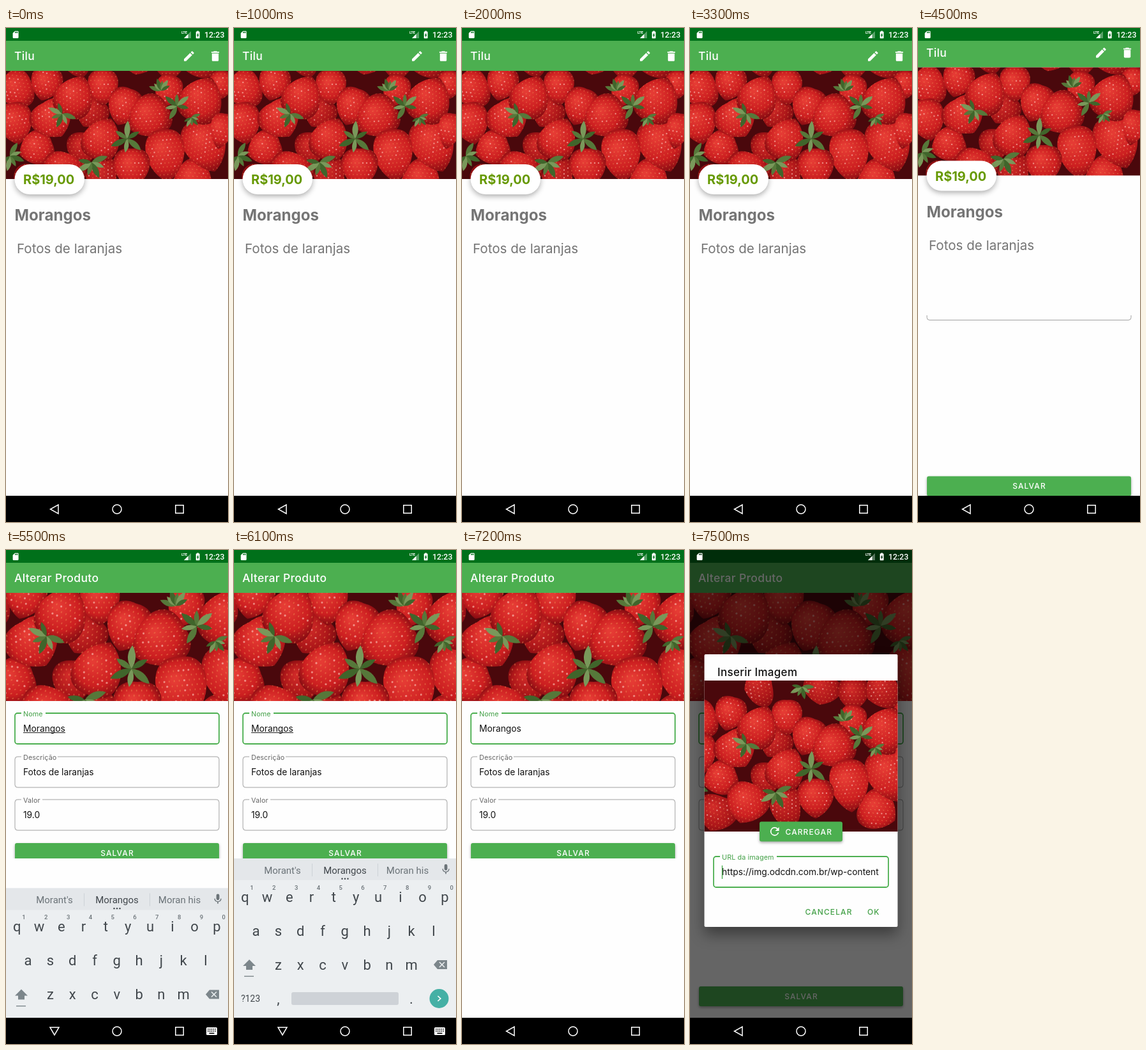
Write an HTML page with a canvas that moves like this. It is 348 by 772 pixels and loops after 8000 ms.

```html
<!DOCTYPE html>
<html lang="pt-BR">
<head>
<meta charset="utf-8">
<title>Alterar Produto</title>
<style>
html, body { margin: 0; width: 100%; height: 100%; overflow: hidden; background: #fff; }
canvas { display: block; width: 348px; height: 772px; }
</style>
</head>
<body>
<canvas id="stage"></canvas>
<script>
const W = 348, H = 772, LOOP = 8000, STEP = 100;
const GREEN = '#4caf50', DARK = '#00701a', PAPER = '#fefefe', GREY = '#757575';
const SANS = 'Inter, "Open Sans", sans-serif', KEYS = 'Roboto, sans-serif';

const stage = document.getElementById('stage');
const dpr = window.devicePixelRatio || 1;
stage.width = W * dpr;
stage.height = H * dpr;
let c = stage.getContext('2d');

// ---------- helpers ----------
function rect(x, y, w, h, fill, r = 0) {
  c.beginPath();
  c.roundRect(x, y, w, h, r);
  c.fillStyle = fill;
  c.fill();
}

function shadowed(blur, dy, alpha, draw) {
  c.save();
  c.shadowColor = `rgba(0,0,0,${alpha})`;
  c.shadowBlur = blur * dpr;
  c.shadowOffsetY = dy * dpr;
  draw();
  c.restore();
}

function text(s, x, y, size, fill, { weight = 400, align = 'left', gap = 0, font = SANS } = {}) {
  c.font = `${weight} ${size}px ${font}`;
  c.letterSpacing = gap + 'px';
  c.textAlign = align;
  c.fillStyle = fill;
  c.fillText(s, x, y);
}

function icon(d, x, y, scale, fill) {
  c.save();
  c.translate(x, y);
  c.scale(scale, scale);
  c.fillStyle = fill;
  c.fill(new Path2D(d));
  c.restore();
}

function poly(points, close = true) {
  c.beginPath();
  points.forEach(([x, y]) => c.lineTo(x, y));
  if (close) c.closePath();
}

function clipTo(x, y, w, h, draw) {
  c.save();
  c.beginPath();
  c.rect(x, y, w, h);
  c.clip();
  draw();
  c.restore();
}

const ease = (t, from, to) => {
  const p = Math.min(1, Math.max(0, (t - from) / (to - from)));
  return 1 - (1 - p) ** 3;
};

const ICON = {
  edit: 'M3 17.25V21h3.75L17.81 9.94l-3.75-3.75zM20.71 7.04a1 1 0 0 0 0-1.41l-2.34-2.34a1 1 0 0 0-1.41 0l-1.83 1.83 3.75 3.75z',
  trash: 'M6 19c0 1.1.9 2 2 2h8c1.1 0 2-.9 2-2V7H6zM19 4h-3.5l-1-1h-5l-1 1H5v2h14z',
  reload: 'M17.65 6.35A8 8 0 1 0 19.73 14h-2.08A6 6 0 1 1 12 6c1.66 0 3.14.69 4.22 1.78L13 11h7V4z',
  card: 'M18 2h-8L4 8v12c0 1.1.9 2 2 2h12c1.1 0 2-.9 2-2V4c0-1.1-.9-2-2-2zM12 8h-2V4h2zm3 0h-2V4h2zm3 0h-2V4h2z',
  battery: 'M15.67 4H14V2h-4v2H8.33C7.6 4 7 4.6 7 5.33v15.33C7 21.4 7.6 22 8.33 22h7.33c.74 0 1.34-.6 1.34-1.33V5.33C17 4.6 16.4 4 15.67 4zM11 20v-5.5H9L13 7v5.5h2z',
  mic: 'M12 14a3 3 0 0 0 3-3V5a3 3 0 0 0-6 0v6a3 3 0 0 0 3 3zm5.3-3a5.3 5.3 0 0 1-10.6 0H5a7 7 0 0 0 6 6.7V21h2v-3.3a7 7 0 0 0 6-6.7z'
};

// ---------- strawberry photo ----------
const PHOTO = { top: 35, h: 240, res: 2 };
// x, y, half width, half height, turn in degrees
const BERRIES = [
  [108, 45, 34, 22, 80], [207, 50, 32, 22, 10], [256, 55, 26, 26, 0], [302, 50, 34, 26, 60],
  [134, 132, 28, 24, 30], [120, 188, 26, 26, 0], [150, 232, 34, 24, 90], [42, 242, 34, 28, 20],
  [16, 96, 32, 27, 70], [63, 86, 26, 27, 15], [152, 92, 25, 28, 0], [338, 88, 20, 22, 0],
  [254, 98, 22, 26, 20], [186, 122, 28, 30, 20], [14, 148, 29, 33, -10], [48, 188, 29, 27, 70],
  [90, 226, 36, 32, 20], [294, 238, 34, 30, -60], [72, 142, 35, 30, -30], [107, 108, 32, 34, 205],
  [150, 174, 31, 34, 205], [224, 139, 35, 35, 60], [312, 182, 36, 43, -20], [250, 198, 32, 41, -5],
  [306, 113, 36, 37, 205], [338, 160, 19, 28, 10], [197, 218, 30, 31, 0]
];
// x, y, blade length, first angle, sweep
const LEAVES = [
  [88, 134, 23, 20, 230], [190, 173, 28, 40, 290], [243, 98, 20, 200, 130], [268, 122, 24, 120, 250],
  [134, 210, 27, -20, 210], [6, 200, 24, -60, 200], [290, 140, 16, -20, 170], [175, 45, 20, 0, 190]
];

function seeded(seed) {
  return () => (seed = (seed * 16807) % 2147483647) / 2147483647;
}

function berry([x, y, rx, ry, deg], i, rnd) {
  const r = Math.max(rx, ry), a = deg * Math.PI / 180;
  c.save();
  c.translate(x, y);
  c.rotate(a);
  c.beginPath();
  c.moveTo(0, -ry * .95);
  c.bezierCurveTo(rx * 1.35, -ry * 1.1, rx * 1.2, ry * .55, 0, ry * 1.05);
  c.bezierCurveTo(-rx * 1.2, ry * .55, -rx * 1.35, -ry * 1.1, 0, -ry * .95);
  c.clip();
  c.rotate(-a);
  const g = c.createRadialGradient(-r * .2, -r * .3, r * .1, 0, 0, r * 1.1);
  g.addColorStop(0, i < 8 ? '#cf2a28' : '#e53b34');
  g.addColorStop(.6, i < 8 ? '#ad1719' : '#cc1f20');
  g.addColorStop(1, '#790a10');
  c.fillStyle = g;
  c.fillRect(-r * 1.4, -r * 1.4, r * 2.8, r * 2.8);
  c.rotate(a);
  for (let row = 0, v = -r; v < r; v += 6, row++) {
    for (let u = -r + (row % 2) * 3; u < r; u += 6) {
      const shine = rnd() < .22 && Math.hypot(u, v) < r * .65;
      c.beginPath();
      c.ellipse(u, v, shine ? 1.2 : .7, 1.2, 0, 0, 7);
      c.fillStyle = shine ? 'rgba(255,205,190,.6)' : 'rgba(240,145,85,.5)';
      c.fill();
    }
  }
  c.restore();
}

function leaf([x, y, len, first, sweep]) {
  const count = 6;
  for (let i = 0; i < count; i++) {
    const l = len * (i % 2 ? .78 : 1);
    c.save();
    c.translate(x, y);
    c.rotate((first + sweep * i / (count - 1)) * Math.PI / 180);
    c.beginPath();
    c.moveTo(0, 0);
    c.quadraticCurveTo(l * .5, -l * .36, l, 0);
    c.quadraticCurveTo(l * .5, l * .3, 0, 0);
    c.fillStyle = ['#56783a', '#79985a', '#40652b'][i % 3];
    c.fill();
    c.restore();
  }
}

function makePhoto() {
  const can = document.createElement('canvas'), main = c, rnd = seeded(41);
  can.width = W * PHOTO.res;
  can.height = PHOTO.h * PHOTO.res;
  c = can.getContext('2d');
  c.scale(PHOTO.res, PHOTO.res);
  c.translate(0, -PHOTO.top);
  c.fillStyle = '#4a080c';
  c.fillRect(0, PHOTO.top, W, PHOTO.h);
  BERRIES.forEach((b, i) => berry(b, i, rnd));
  LEAVES.forEach(leaf);
  c = main;
  return can;
}
const photoCanvas = makePhoto();

function photo(x, y, w, h, scale, dx, dy) {
  clipTo(x, y, w, h, () =>
    c.drawImage(photoCanvas, dx, PHOTO.top * scale + dy, W * scale, PHOTO.h * scale));
}

// ---------- system bars ----------
function statusIcons() {
  icon(ICON.card, 8.4, 3.6, .56, '#fff');
  text('LTE', 275, 9, 6, '#fff', { weight: 700, font: KEYS, gap: -.3 });
  poly([[290, 5], [290, 16], [279, 16]]);
  c.fillStyle = 'rgba(255,255,255,.35)';
  c.fill();
  poly([[285.5, 9.5], [285.5, 16], [279, 16]]);
  c.fillStyle = '#fff';
  c.fill();
  icon(ICON.battery, 293.6, 3.2, .59, '#fff');
  text('12:23', 311, 15, 12.4, '#fff', { weight: 500, font: KEYS });
}

function navBar(ime) {
  rect(0, 731, W, 41, '#000');
  c.strokeStyle = '#fff';
  c.lineWidth = 1.5;
  poly(ime ? [[69, 746], [83, 746], [76, 758]] : [[82, 745], [82, 759], [69.5, 752]]);
  c.stroke();
  c.beginPath();
  c.arc(174, 752, 7, 0, 7);
  c.stroke();
  c.strokeRect(265.8, 745.8, 12.4, 12.4);
  if (!ime) return;
  rect(314, 746, 17, 12, '#fff', 1.5);
  for (let i = 0; i < 10; i++) rect(316 + (i % 5) * 2.8, 748 + (i > 4) * 3, 1.6, 1.6, '#000');
  rect(318.5, 754.5, 8, 1.6, '#000');
}

function appBar(title) {
  rect(0, 0, W, 20, DARK);
  rect(0, 20, W, 47, GREEN);
  text(title, 13, 50, 17.5, '#fff', { weight: 500, gap: .35 });
}

// ---------- screens ----------
function detailScreen() {
  rect(0, 0, W, H, PAPER);
  appBar('Tilu');
  icon(ICON.edit, 276.4, 33.6, .87, '#fff');
  icon(ICON.trash, 317.6, 33.6, .87, '#fff');
  photo(0, 67, W, 169, 1, 0, 0);
  shadowed(8, 3, .32, () => rect(13.5, 213, 109.5, 47, '#fff', 23.5));
  text('R$19,00', 27, 244, 20, '#669900', { weight: 700 });
  text('Morangos', 13.5, 301, 24.2, GREY, { weight: 700 });
  text('Fotos de laranjas', 17, 352, 20.6, GREY);
}

function field(label, value, x, y, w, gapW, active) {
  c.beginPath();
  c.roundRect(x, y, w, 48, 4);
  c.strokeStyle = active ? GREEN : '#a0a0a0';
  c.lineWidth = active ? 1.8 : 1;
  c.stroke();
  rect(x + 10, y - 3, gapW, 6, PAPER);
  text(label, x + 13, y + 4.5, 10.8, active ? '#43a047' : '#666', { gap: .1 });
  clipTo(x + 12, y + 4, w - 26, 40, () => text(value, x + 13, y + 29, 13.8, '#111'));
}

function button(label, x, y, w, tx, align) {
  shadowed(4, 2, .35, () => rect(x, y, w, 31, GREEN, 3));
  text(label, tx, y + 20, 12, '#fff', { weight: 500, gap: 1.1, align });
}

function editScreen({ resized, composing, cursor }) {
  rect(0, 0, W, H, PAPER);
  appBar('Alterar Produto');
  photo(0, 67, W, 169, 1.31, -52, -41);
  field('Nome', 'Morangos', 14, 255, 320, 38, true);
  field('Descrição', 'Fotos de laranjas', 14, 323, 320, 57);
  field('Valor', '19.0', 14, 390, 320, 33);
  if (composing) rect(27, 285, 66, 1, '#222');
  if (cursor) rect(27.3, 269, 1.4, 21, GREEN);
  const y = resized ? 458 : 682;
  clipTo(0, 0, W, resized ? 482 : 731, () => button('SALVAR', 14, y, 320, 174.5, 'center'));
}

function keyboard(dy) {
  const ink = '#41474c', dim = '#6b7378', opt = { align: 'center', font: KEYS };
  c.save();
  c.translate(0, dy);
  rect(0, 482, W, 249, '#eceff1');
  rect(0, 482, W, 34, '#e4e7ea');
  text("Morant's", 76, 506, 15, dim, opt);
  text('Morangos', 174, 506, 15, ink, opt);
  text('Moran his', 272, 506, 15, dim, opt);
  [122, 225].forEach(x => rect(x, 490, 1, 20, '#cdd2d6'));
  [169.5, 174, 178.5].forEach(x => rect(x - 1.2, 512.5, 2.4, 2.4, ink, 1.2));
  icon(ICON.mic, 322.5, 489.5, .8, dim);

  [['qwertyuiop', 17.2, 550], ['asdfghjkl', 34.6, 603], ['zxcvbnm', 69.4, 656]].forEach(([row, x0, y]) =>
    [...row].forEach((k, i) => text(k, x0 + i * 34.8, y, 22, ink, opt)));
  for (let i = 0; i < 10; i++) text((i + 1) % 10, 28 + i * 34.8, 531, 9.5, dim, { ...opt, weight: 500 });

  poly([[24, 640], [34, 650], [29, 650], [29, 656], [19, 656], [19, 650], [14, 650]]);
  c.fillStyle = '#7c868b';
  c.fill();
  rect(16, 665.5, 15, 1.4, '#7c868b');
  poly([[313, 648], [319, 641], [334, 641], [334, 655], [319, 655]]);
  c.fill();
  c.strokeStyle = '#eceff1';
  c.lineWidth = 1.6;
  [[322, 330], [330, 322]].forEach(([a, b]) => {
    poly([[a, 644], [b, 652]], false);
    c.stroke();
  });

  text('?123', 26, 706, 14, ink, opt);
  text(',', 69.5, 709, 22, ink, opt);
  text('.', 278, 709, 22, ink, opt);
  rect(90, 691, 168, 20, '#ced2d7', 3);
  rect(306.5, 686, 30, 30, '#45b0a5', 15);
  poly([[319.5, 697], [323.8, 701], [319.5, 705]], false);
  c.strokeStyle = '#fff';
  c.lineWidth = 1.7;
  c.stroke();
  c.restore();
}

function dialog(p) {
  rect(0, 0, W, H, `rgba(0,0,0,${.6 * p})`);
  c.save();
  c.globalAlpha = p;
  shadowed(22, 12, .4, () => rect(22.5, 163, 303, 426, PAPER, 2));
  text('Inserir Imagem', 43, 197, 17, '#111', { weight: 500, gap: .3 });
  photo(22.5, 204, 303, 236, 1, 0, 169);
  button('CARREGAR', 109, 424.5, 130, 149.5);
  icon(ICON.reload, 122.4, 429.5, .86, '#fff');
  field('URL da imagem', 'https://img.odcdn.com.br/wp-content', 37, 479, 274, 89, true);
  rect(49.8, 493, 1.4, 21, GREEN);
  const opt = { weight: 500, gap: 1.1 };
  text('CANCELAR', 180.5, 570, 12, '#43a047', opt);
  text('OK', 278, 570, 12, '#43a047', opt);
  c.restore();
}

// ---------- timeline ----------
function draw(t) {
  const open = ease(t, 4440, 4840);
  const shown = ease(t, 5350, 5700);
  const hidden = Math.max(0, (t - 6750) / 250) ** 1.5;
  const popup = ease(t, 7370, 7490);
  const ime = t >= 5200 && t < 7000;

  if (open < 1) {
    c.save();
    c.translate(0, -14 * open);
    detailScreen();
    c.restore();
  }
  if (open > 0) {
    clipTo(0, 731 * (1 - open), W, H, () => {
      c.translate(0, 30 * (1 - open));
      editScreen({
        resized: t >= 5400 && t < 7400,
        composing: t >= 5200 && t < 7200,
        cursor: t < 5500
      });
    });
  }
  if (shown > 0 && hidden < 1) keyboard(249 * (1 - shown + hidden));
  rect(0, 0, W, 20, DARK);
  if (popup > 0) dialog(popup);
  statusIcons();
  navBar(ime);
}

function tick(now) {
  const t = Math.floor((now % LOOP) / STEP) * STEP;
  c.setTransform(dpr, 0, 0, dpr, 0, 0);
  c.clearRect(0, 0, W, H);
  draw(t);
  requestAnimationFrame(tick);
}
requestAnimationFrame(tick);
</script>
</body>
</html>
```
